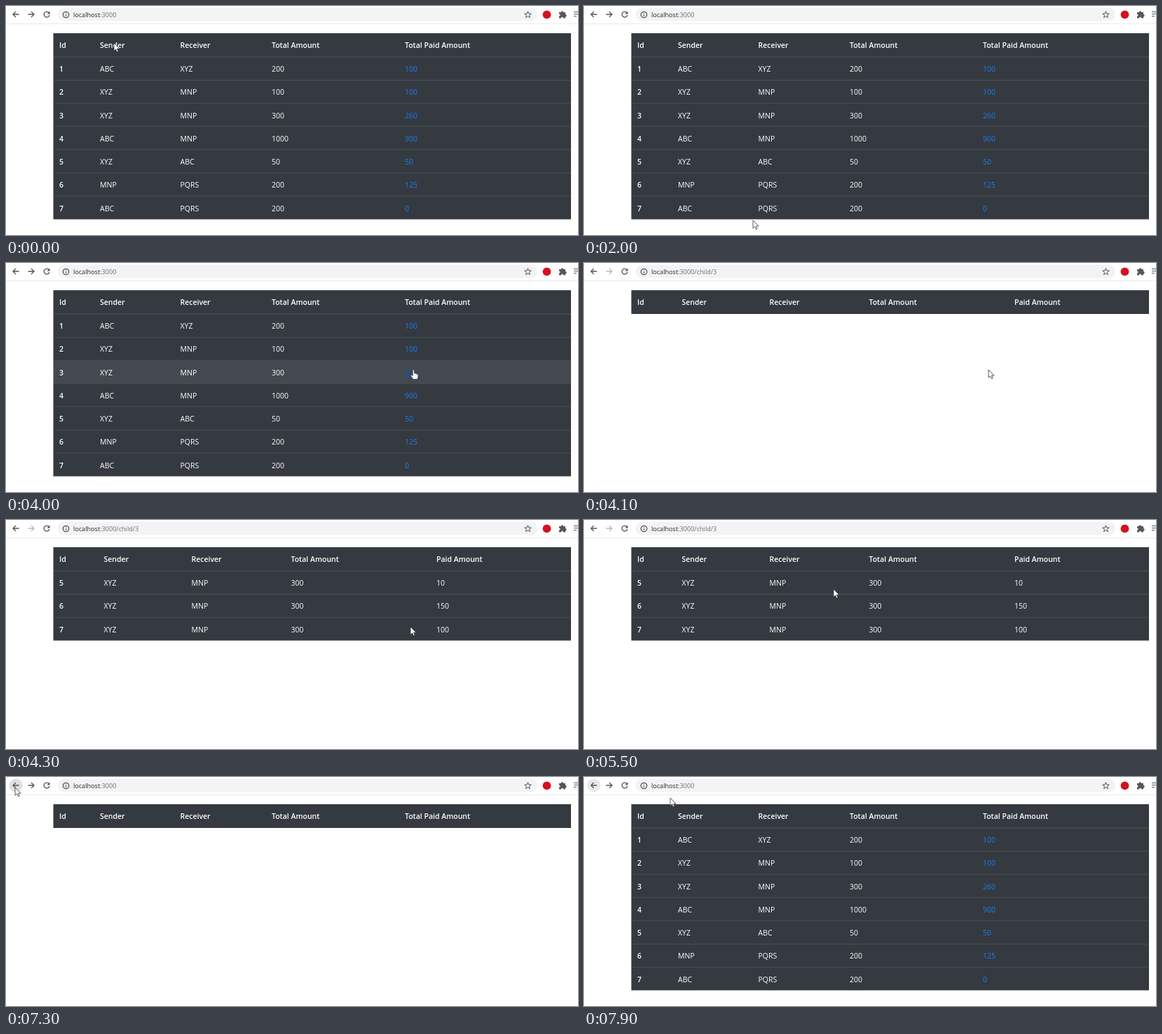
Write an HTML page that moves like this. It is 816 px wide and 328 px high and loops after 8 s.

```html
<!DOCTYPE html>
<html lang="en">
<head>
<meta charset="utf-8">
<title>Transactions</title>
<style>
  html, body { margin: 0; width: 100%; height: 100%; overflow: hidden; background: #fff; }
  svg { display: block; width: 816px; height: 328px; }
  text { font: 10.5px "Open Sans", "Noto Sans", sans-serif; fill: #fff; white-space: pre; }
  .bold { font-weight: 600; }
  .url { font-size: 9.1px; fill: #27292c; }
  .url .dim { fill: #6b6f74; }
  .link { fill: #1a7cf2; }
  .link.on { fill: #0056b3; text-decoration: underline; }
  .icon { fill: none; stroke: #505357; stroke-width: 1.3; }
</style>
</head>
<body>
<svg id="stage" viewBox="0 0 816 328">
  <rect width="816" height="328" fill="#fff"/>
  <path d="M0 25.5H816" stroke="#e9eaec"/>
  <rect x="74" y="2.5" width="684" height="19" rx="9.5" fill="#f1f3f4"/>
  <circle id="halo" cx="14" cy="12" r="9.7" fill="#dfe0e2"/>
  <path class="icon" d="M18.5 12H10M14 8l-4 4 4 4"/>
  <path class="icon" id="forward" d="M31.500 12H40M36 8l4 4-4 4"/>
  <path class="icon" d="M61.200 9.500A4 4 0 1 0 62 13"/>
  <path d="M62.500 7.500v4h-4z" fill="#505357"/>
  <circle class="icon" cx="85.500" cy="12.500" r="4.200" stroke-width="1"/>
  <path class="icon" d="M85.500 12v2.800M85.500 10v1.100" style="stroke-width:1"/>
  <text class="url" x="96" y="15.700">localhost<tspan class="dim" id="path"></tspan></text>
  <path class="icon" id="star" style="stroke-width:1"/>
  <circle cx="771.500" cy="12.300" r="5.900" fill="#d5101f"/>
  <path d="M789 9h2.800a1.700 1.700 0 1 1 3.400 0H798v3a1.700 1.700 0 1 1 0 3.400V17.500h-2.700a1.700 1.700 0 0 0-3.400 0H789v-2.900a1.600 1.600 0 0 0 0-3.200z" fill="#54575b"/>
  <path d="M810 8.500h6M810 11.500h6M810 14.500h4" stroke="#54575b" stroke-width="1.200"/>
  <g id="tables"></g>
  <g id="cursor" stroke-linejoin="round">
    <path id="arrow" d="M0 0V11.300L2.600 8.900 4.300 12.800 6.200 12 4.500 8.200H8Z" fill="#fff" stroke="#303030" stroke-width=".8"/>
    <path id="hand" d="M-.8 1Q.4-.8 1.500 1V5Q3 4.300 3.500 5.600 5 5 5.300 6.300 7 5.900 7 7.500V10Q6.600 12 5.700 13.500H-.3Q-1.500 11-3.600 8.800-3.700 7-1.900 7.600L-.8 8.700Z" fill="#fff" stroke="#303030" stroke-width=".7"/>
  </g>
</svg>
<script>
const NS = 'http://www.w3.org/2000/svg';
const $ = id => document.getElementById(id);
const LEFT = 67.5, WIDTH = 738.5, TOP = 39, BODY = 73, ROW = 33.22;
const LOOP = 8000, STEP = 100;

function add(parent, tag, attrs, text = '') {
  const el = document.createElementNS(NS, tag);
  for (const key in attrs) el.setAttribute(key, attrs[key]);
  el.textContent = text;
  return parent.appendChild(el);
}

const show = (el, on) => { el.style.display = on ? '' : 'none'; };

function makeTable(cols, heads, data, linked) {
  const root = add($('tables'), 'g', {});
  add(root, 'rect', { x: LEFT, y: TOP, width: WIDTH, height: BODY - TOP, fill: '#343a40' });
  heads.forEach((h, i) => add(root, 'text', { class: 'bold', x: cols[i], y: 60 }, h));
  const body = add(root, 'g', {});
  const rows = data.map((line, r) => {
    const y = BODY + r * ROW;
    const back = add(body, 'rect', { x: LEFT, y, width: WIDTH, height: ROW, fill: '#343a40' });
    add(body, 'rect', { x: LEFT, y: y - .5, width: WIDTH, height: 1, fill: r ? '#41484f' : '#50575e' });
    const cells = line.split(' ').map((value, i) => {
      const type = i === 0 ? 'bold' : linked && i === 4 ? 'link' : '';
      return add(body, 'text', { class: type, x: cols[i], y: y + 21.2 }, value);
    });
    return { back, last: cells[4] };
  });
  return { root, body, rows };
}

const main = makeTable(
  [76, 134, 248.5, 379, 569],
  ['Id', 'Sender', 'Receiver', 'Total Amount', 'Total Paid Amount'],
  ['1 ABC XYZ 200 100', '2 XYZ MNP 100 100', '3 XYZ MNP 300 260', '4 ABC MNP 1000 900',
   '5 XYZ ABC 50 50', '6 MNP PQRS 200 125', '7 ABC PQRS 200 0'], true);

const child = makeTable(
  [76, 139.5, 264.5, 406.5, 614],
  ['Id', 'Sender', 'Receiver', 'Total Amount', 'Paid Amount'],
  ['5 XYZ MNP 300 10', '6 XYZ MNP 300 150', '7 XYZ MNP 300 100'], false);

const starPoints = Array.from({ length: 10 }, (_, i) => {
  const a = i * Math.PI / 5 - Math.PI / 2, r = i % 2 ? 2.1 : 5;
  return `${744.5 + r * Math.cos(a)} ${12.6 + r * Math.sin(a)}`;
});
$('star').setAttribute('d', `M${starPoints.join('L')}Z`);

// Pointer stops: time, x, y
const stops = [
  [0, 154, 53], [600, 215, 212], [1100, 215, 212], [1300, 226, 213], [1900, 226, 213],
  [2000, 241, 307], [2800, 470, 158], [3700, 581, 153], [4000, 581, 153], [4100, 577, 153],
  [5200, 577, 153], [5800, 135, 45], [6000, 135, 45], [6500, 31, 24], [6800, 13, 15],
  [7700, 13, 15], [7900, 123, 30], [8000, 123, 30]
];

function pointer(t) {
  const i = stops.findIndex(s => s[0] > t);
  const [t0, x0, y0] = stops[i - 1], [t1, x1, y1] = stops[i];
  const u = (t - t0) / (t1 - t0), e = u * u * (3 - 2 * u);
  return [x0 + (x1 - x0) * e, y0 + (y1 - y0) * e];
}

function draw(t) {
  const [x, y] = pointer(t);
  const inChild = t >= 4100 && t < 7200;
  const loading = t === 4100 || (t >= 7200 && t < 7400);
  const hovered = inChild || loading ? -1 : Math.floor((y - BODY) / ROW);
  const onLink = hovered >= 0 && hovered < 7 && x > 568 && x < 588;

  show(main.root, !inChild);
  show(child.root, inChild);
  show(main.body, !loading);
  show(child.body, !loading);
  main.rows.forEach((row, i) => {
    row.back.setAttribute('fill', i === hovered ? '#43494e' : '#343a40');
    row.last.classList.toggle('on', onLink && i === hovered);
  });

  $('path').textContent = inChild ? ':3000/child/3' : ':3000';
  $('forward').style.opacity = inChild ? .4 : 1;
  show($('halo'), t >= 6700);
  $('halo').style.opacity = t >= 7900 ? .7 : 1;
  show($('hand'), onLink);
  show($('arrow'), !onLink);
  $('cursor').setAttribute('transform', `translate(${x} ${y})`);
}

function tick() {
  draw(Math.floor(performance.now() % LOOP / STEP) * STEP);
  requestAnimationFrame(tick);
}
tick();
</script>
</body>
</html>
```
